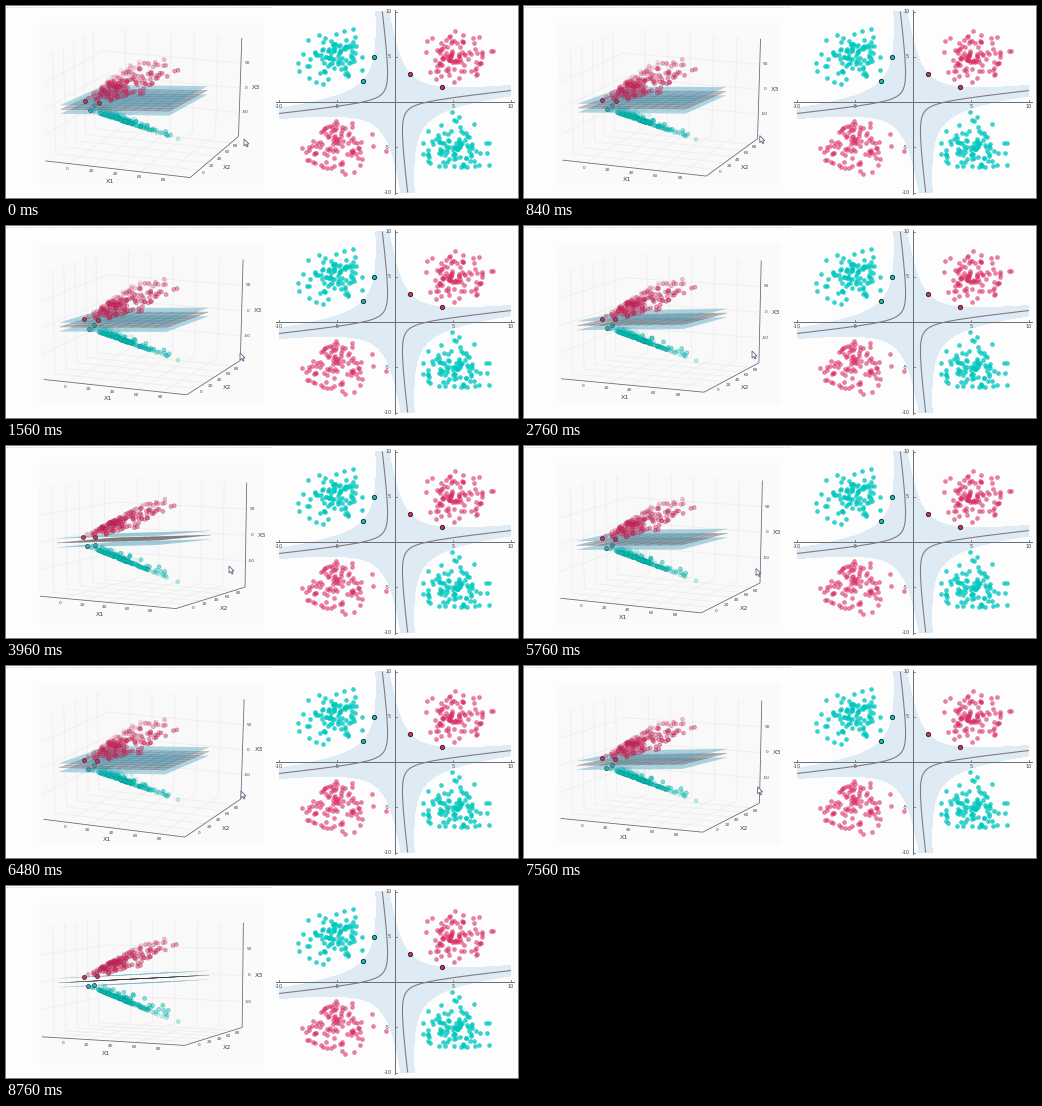
A matplotlib script that plays this animation: 512 by 192 pixels, repeating every 8.88 s.

```python
import numpy as np
import matplotlib.pyplot as plt
from matplotlib.animation import FuncAnimation
from matplotlib.collections import LineCollection
from matplotlib.colors import to_rgb
from matplotlib.patches import FancyBboxPatch

W, H, DPI = 512, 192, 100
FRAMES, STEP = 74, 120
PX = 72 / DPI                       # points per pixel
TEAL, PINK, BLUE = "#00c8bf", "#d92b62", "#4ea5c4"

# Quadratic boundary: QA*x^2 + QB*x*y + QC*y^2 + QD = 0, margins at -1 and 1
QA, QB, QC, QD = -0.0238, 0.171, 0.0171, 0.187
ROOT2 = np.sqrt(2)

# Key poses of the dragged view: frame, azimuth, elevation, pointer x, y
KEYS = np.array([
    [0, -69, 21, 238, 133],
    [13, -67, 17, 234, 127],
    [23, -66.5, 14, 228, 125],
    [33, -61, 9.8, 223, 120],
    [42, -64, 9.5, 229, 120],
    [54, -66, 19.5, 235, 125],
    [73, -65.5, 7.3, 232, 116],
])
POINTER_END = 66

fig = plt.figure(figsize=(W / DPI, H / DPI), dpi=DPI, facecolor="#fdfdfd")
ax = fig.add_axes([0, 0, 1, 1])
ax.set(xlim=(0, W), ylim=(H, 0))
ax.axis("off")


def decision(x, y):
    return QA * x * x + QB * x * y + QC * y * y + QD


def cluster(rng, cx, cy, n=98):
    """Gaussian blob that keeps clear of the margin band."""
    pts = rng.normal((cx, cy), (1.45, 1.3), (n * 3, 2))
    near = np.hypot(pts[:, 0] - cx, pts[:, 1] - cy) < 3.5
    clear = np.abs(decision(pts[:, 0], pts[:, 1])) > 1.15
    return pts[near & clear][:n]


def lift(pts):
    """Kernel map (x, y) -> (x^2, y^2, sqrt(2)xy)."""
    x, y = np.asarray(pts).T
    return np.column_stack([x * x, y * y, ROOT2 * x * y])


rng = np.random.default_rng(12)
teal = np.vstack([cluster(rng, -5.2, 5.1), cluster(rng, 5.2, -5.0), [(4.9, -1.1)]])
pink = np.vstack([cluster(rng, 5.2, 4.9), cluster(rng, -5.0, -5.0), [(-0.8, -5.4)]])
teal_sv = np.array([(-1.8, 5.0), (-2.76, 2.33)])
pink_sv = np.array([(1.3, 3.1), (4.05, 1.67)])


def text(x, y, s, size, color="#444448"):
    return ax.text(x, y, s, fontsize=size * PX, color=color, ha="center",
                   va="center", family="DejaVu Sans", zorder=9)


# ---- Flat plot on the right ----
def flat(pts):
    x, y = np.asarray(pts).T
    return 389 + 11.6 * x, 96 - 9.05 * y


def draw_flat():
    gx, gy = np.meshgrid(np.linspace(-10, 10, 300), np.linspace(-10, 10, 300))
    f = decision(gx, gy)
    sx, sy = 389 + 11.6 * gx, 96 - 9.05 * gy
    ax.contourf(sx, sy, f, levels=[-1, 1], colors=["#deebf5"], zorder=1)
    ax.contour(sx, sy, f, levels=[0], colors=["#84797f"], linewidths=1.1 * PX, zorder=3)
    ax.plot([270, 508], [95.5, 95.5], color="#6d7077", lw=1 * PX, zorder=2)
    ax.plot([388.5, 388.5], [4, 188], color="#6d7077", lw=1 * PX, zorder=2)
    for v in (-10, -5, 5, 10):
        x, y = 389 + 11.6 * v, 96 - 9.05 * v
        ax.plot([x, x], [93.5, 95.5], color="#6d7077", lw=0.8 * PX, zorder=2)
        ax.plot([388.5, 390.5], [y, y], color="#6d7077", lw=0.8 * PX, zorder=2)
        text(x, 101, str(v), 5)
        text(383 if v > 0 else 381.5, y, str(v), 5)
    for pts, color, alpha in ((teal, TEAL, 0.78), (pink, PINK, 0.58)):
        ax.scatter(*flat(pts), s=(4 * PX) ** 2, c=color, alpha=alpha,
                   linewidths=0.5 * PX, edgecolors=color, zorder=4)
    for pts, color in ((teal_sv, TEAL), (pink_sv, PINK)):
        ax.scatter(*flat(pts), s=(4.3 * PX) ** 2, c=color, linewidths=0.9 * PX,
                   edgecolors="#26282c", zorder=5)


# ---- Rotating plot on the left ----
LOW = np.array([-20, -20, -100])
SPAN = np.array([120, 120, 200])


def camera(az, el):
    """Return a function giving screen points and depth for data points."""
    a, e = np.radians([az, el])
    right = np.array([-np.sin(a), np.cos(a), 0])
    up = np.array([-np.sin(e) * np.cos(a), -np.sin(e) * np.sin(a), np.cos(e)])
    toward = np.array([np.cos(e) * np.cos(a), np.cos(e) * np.sin(a), np.sin(e)])

    def project(pts):
        p = (np.asarray(pts, float) - LOW) / SPAN - 0.5
        depth = p @ toward
        k = 10 / (10 - depth)
        xy = np.column_stack([138.5 + 152 * k * (p @ right), 92.8 - 108 * k * (p @ up)])
        return xy, depth

    return project


TICKS = (0, 20, 40, 60, 80)
Z_TICKS = (-50, 0, 50)
LO, HI, ZLO, ZHI = -20, 100, -100, 100

PANES = [
    [(LO, LO, ZLO), (HI, LO, ZLO), (HI, HI, ZLO), (LO, HI, ZLO)],
    [(LO, HI, ZLO), (HI, HI, ZLO), (HI, HI, ZHI), (LO, HI, ZHI)],
    [(LO, LO, ZLO), (LO, HI, ZLO), (LO, HI, ZHI), (LO, LO, ZHI)],
]
GRID = [[(t, LO, ZLO), (t, HI, ZLO), (t, HI, ZHI)] for t in TICKS]
GRID += [[(HI, t, ZLO), (LO, t, ZLO), (LO, t, ZHI)] for t in TICKS]
GRID += [[(LO, LO, t), (LO, HI, t), (HI, HI, t)] for t in Z_TICKS]
AXES = [[(LO, LO, ZLO), (HI, LO, ZLO)],
        [(HI, LO, ZLO), (HI, HI, ZLO)],
        [(HI, HI, ZLO), (HI, HI, ZHI)]]

# label text, data position, pixel offset, size
LABELS = [(str(t), (t, LO, ZLO), (-1.5, 5), 4.3) for t in TICKS]
LABELS += [(str(t), (HI, t, ZLO), (4.5, 3), 4.3) for t in TICKS]
LABELS += [(str(t), (HI, HI, t), (6, 0), 4.3) for t in Z_TICKS]
LABELS += [("X1", (40, LO, ZLO), (-6, 12), 6.4),
           ("X2", (HI, 40, ZLO), (12, 11), 6.4),
           ("X3", (HI, HI, 0), (16, 0), 6.4)]


def plane_point(x, y, level):
    return x, y, ROOT2 / QB * (level - QD - QA * x - QC * y)


def plane_lines(level):
    near, far = -10, 79
    lines = []
    for t in np.linspace(near, far, 10):
        lines.append([plane_point(t, near, level), plane_point(t, far, level)])
        lines.append([plane_point(near, t, level), plane_point(far, t, level)])
    corners = [(near, near), (far, near), (far, far), (near, far)]
    return [plane_point(x, y, level) for x, y in corners], lines


def line_set(color, width, z, alpha=1):
    lines = LineCollection([], colors=color, linewidths=width * PX, zorder=z, alpha=alpha)
    return ax.add_collection(lines)


def polygon(color, z, alpha=1):
    return ax.fill([0, 1, 1], [0, 0, 1], color=color, zorder=z, alpha=alpha, lw=0)[0]


def dots(pts, size, z, width):
    return ax.scatter(*np.zeros((2, len(pts))), s=(size * PX) ** 2,
                      linewidths=width * PX, zorder=z)


draw_flat()
ax.plot([0, 265], [0.5, 0.5], color="#d4d4e6", lw=1 * PX, ls=(0, (1.5, 1.5)), zorder=0)
ax.add_patch(FancyBboxPatch((39, 23), 212, 150, boxstyle="round,pad=6",
                            color="#fafafa", lw=0, zorder=0.2))

panes = [polygon("#f9f9f9", 0.5) for _ in PANES]
grid = line_set("#ececee", 0.7, 1)
axis_lines = line_set("#686a74", 0.8, 2)
labels = [text(0, 0, s, size) for s, _, _, size in LABELS]

planes = []
for i, level in enumerate((-1, 0, 1)):
    if level == 0:
        face, edge, edge_alpha = "#857a80", "#2f2c30", 0.3
    else:
        face, edge, edge_alpha = BLUE, "#5fa9bd", 0.14
    corners, lines = plane_lines(level)
    planes.append((polygon(face, 4 + i * 0.2, 0.42), corners,
                   line_set(edge, 0.5, 4.1 + i * 0.2, edge_alpha), lines))

clouds = []
for pts, sv, color, z in ((teal, teal_sv, TEAL, 3), (pink, pink_sv, PINK, 5)):
    clouds.append((lift(pts), dots(pts, 4, z, 0.5), np.array(to_rgb(color))))
    support = dots(sv, 4, z + 0.1, 0.8)
    support.set_facecolor(color)
    support.set_edgecolor("#3a3a40")
    clouds.append((lift(sv), support, None))

ARROW = np.array([(0, 0), (0, 7), (1.7, 5.5), (2.9, 8), (4, 7.5), (2.9, 5.1), (5, 5)])
pointer = ax.fill(*ARROW.T, facecolor="white", edgecolor="#56617c",
                  lw=0.8 * PX, zorder=10)[0]


def pose(n):
    """Ease between the two key poses around frame n."""
    i = min(np.searchsorted(KEYS[:, 0], n, side="right"), len(KEYS) - 1)
    a, b = KEYS[i - 1], KEYS[i]
    t = (n - a[0]) / (b[0] - a[0])
    t = t * t * (3 - 2 * t)
    return (a + (b - a) * t)[1:]


def update(n):
    az, el, px, py = pose(n)
    project = camera(az, el)

    def flatten(lines):
        return [project(line)[0] for line in lines]

    for patch, corners in zip(panes, PANES):
        patch.set_xy(project(corners)[0])
    grid.set_segments(flatten(GRID))
    axis_lines.set_segments(flatten(AXES))
    spots = project([p for _, p, _, _ in LABELS])[0]
    for label, spot, (_, _, shift, _) in zip(labels, spots, LABELS):
        label.set_position(spot + shift)
    for patch, corners, mesh, lines in planes:
        patch.set_xy(project(corners)[0])
        mesh.set_segments(flatten(lines))
    for pts, marks, rgb in clouds:
        xy, depth = project(pts)
        marks.set_offsets(xy)
        if rgb is not None:
            near = (depth - depth.min()) / np.ptp(depth)
            alpha = 0.1 + 0.4 * near
            marks.set_facecolor(np.column_stack([np.tile(rgb, (len(pts), 1)), alpha]))
            marks.set_edgecolor(np.column_stack([np.tile(rgb * 0.65, (len(pts), 1)), alpha]))
    pointer.set_xy(ARROW + (px, py))
    pointer.set_visible(n < POINTER_END)
    return []


ani = FuncAnimation(fig, update, frames=FRAMES, interval=STEP, repeat=True, repeat_delay=0)
plt.show()
```
